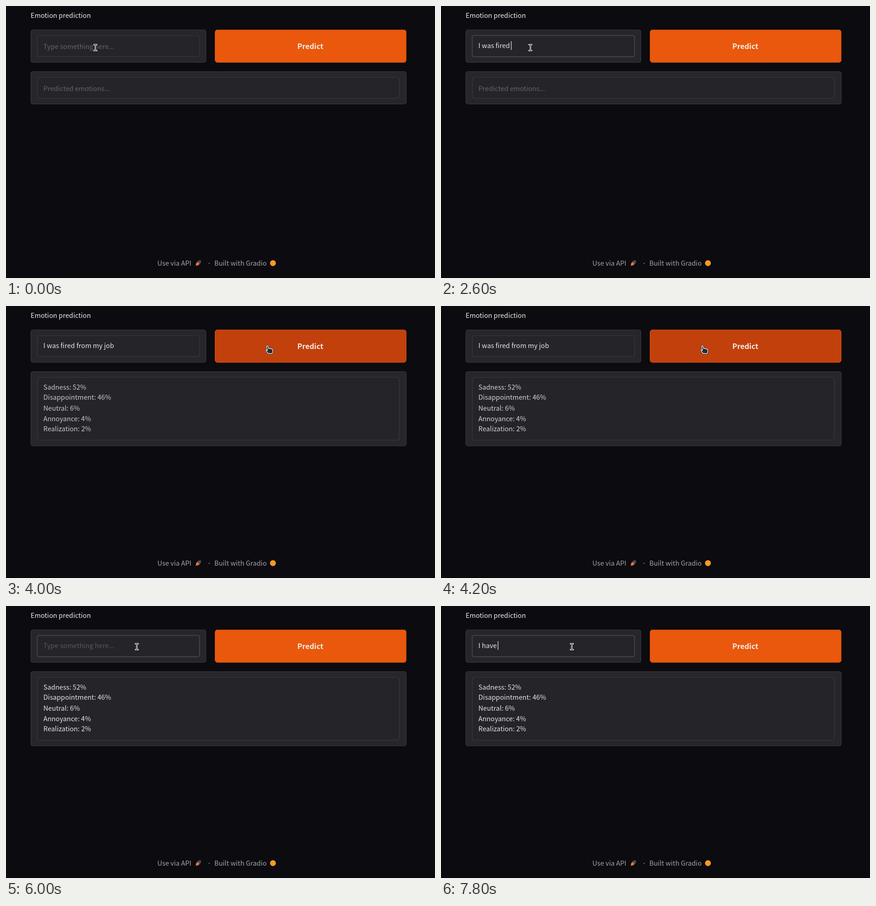
These frames come from a looping animation (941 px wide and 595 px high, 8000 ms). An HTML page with a canvas:

```html
<!DOCTYPE html>
<html lang="en">
<head>
<meta charset="utf-8">
<title>Emotion prediction</title>
<style>
  html, body { margin: 0; width: 100%; height: 100%; overflow: hidden; background: #0c0b0f; }
  canvas { display: block; }
</style>
</head>
<body>
<canvas id="stage" width="941" height="595"></canvas>
<script>
const ctx = document.getElementById("stage").getContext("2d");
const LOOP = 8000, STEP = 100;
const FAMILY = '"Noto Sans CJK JP", "Noto Sans CJK SC", "Noto Sans CJK", "Open Sans", sans-serif';
const BODY = `14.68px ${FAMILY}`, BOLD = `bold 16px ${FAMILY}`;
const PANEL = "#27262a", LINE = "#3c3b40", INK = "#e4e4e7";
const ZOOM = 1.025, LINE_HEIGHT = 22.4;
const RESULTS = ["Sadness: 52%", "Disappointment: 46%", "Neutral: 6%", "Annoyance: 4%", "Realization: 2%"];

// Each entry is [time, text typed at that time].
const KEYS = [
  [1200, "I"], [1300, " "], [1500, "w"], [1600, "a"], [1700, "s"], [1800, " "],
  [2000, "f"], [2100, "i"], [2200, "r"], [2300, "e"], [2400, "d"],
  [2600, " "], [2700, "f"], [2800, "r"], [2900, "om"], [3000, " "], [3100, "m"],
  [3200, "y"], [3300, " j"], [3400, "ob"],
  [7100, "I"], [7200, " "], [7300, "h"], [7400, "a"], [7500, "v"], [7600, "e"], [7700, " "]
];
const CLEARED = 5900;
// Pointer stops: time, x, y.
const POINTER = [
  [0, 196, 91], [3400, 196, 91], [3500, 270, 95], [3600, 428, 100], [3700, 545, 97], [3800, 576, 95],
  [4700, 576, 95], [4800, 545, 94], [4900, 450, 90], [5000, 351, 88], [5100, 305, 88], [5300, 287, 89], [LOOP, 287, 89]
];

const within = (t, a, b) => t >= a && t < b;
const ramp = (t, a, b) => Math.min(1, Math.max(0, (t - a) / (b - a)));
const mix = (a, b, k) => `rgb(${a.map((v, i) => Math.round(v + (b[i] - v) * k))})`;

function pointerAt(t) {
  const i = POINTER.findIndex(p => p[0] > t);
  const [t0, x0, y0] = POINTER[i - 1], [t1, x1, y1] = POINTER[i];
  const k = ramp(t, t0, t1);
  return [x0 + (x1 - x0) * k, y0 + (y1 - y0) * k];
}

function typedAt(t) {
  const since = t >= CLEARED ? CLEARED : 0;
  return KEYS.filter(k => within(k[0], since, t + 1)).map(k => k[1]).join("");
}

function caretOn(t) {
  return within(t, 100, 600) || within(t, 1000, 3500) || within(t, 6100, 6600) || t >= 7100;
}

function text(str, x, y, color, font = BODY, align = "left") {
  ctx.font = font;
  ctx.textAlign = align;
  ctx.fillStyle = color;
  ctx.fillText(str, x, y);
}

function dot(x, y, r, color) {
  ctx.fillStyle = color;
  ctx.beginPath();
  ctx.arc(x, y, r, 0, Math.PI * 2);
  ctx.fill();
}

function box(x, y, w, h, r, fill, stroke, width = 1) {
  ctx.beginPath();
  ctx.roundRect(x, y, w, h, r);
  ctx.fillStyle = fill;
  ctx.fill();
  ctx.strokeStyle = stroke;
  ctx.lineWidth = width;
  ctx.stroke();
}

function drawInput(t) {
  const focus = t < 3900 ? ramp(t, 0, 300) : ramp(t, 5600, 5900);
  const typed = typedAt(t);
  box(54.5, 52.3, 384, 71, 4, PANEL, LINE);
  box(69 - focus * .5, 65 - focus * .5, 355 + focus, 45.5 + focus, 4, "#252428",
    mix([60, 59, 64], [67, 66, 72], focus), 1 + focus);
  if (typed) text(typed, 82, 92, INK);
  else if (t < CLEARED) text("Type something here...", 82, 94, "#646367");
  else text("Type something here...", 82, 92, "#505a67");
  if (caretOn(t)) {
    ctx.font = BODY;
    ctx.fillStyle = "#f4f4f5";
    ctx.fillRect(Math.round(81.5 + ctx.measureText(typed).width) - .5, typed ? 77 : 78, 1.2, 19);
  }
}

function drawButton(t) {
  const hover = ramp(t, 3600, 3800) * (1 - ramp(t, 4700, 5100));
  box(458.6, 52.3, 419.2, 71, 5, mix([233, 88, 12], [194, 64, 12], hover), "#e4560f");
  text("Predict", 667.5, 94, "#f6eeea", BOLD, "center");
}

function drawOutput(t) {
  const done = t >= 4000, grow = done ? 91.5 : 0;
  box(54.5, 143.5, 823.5, 71 + grow, 4, PANEL, LINE);
  box(69, 156, 793.5, 46 + grow, 4, "#252428", LINE);
  if (!done) return text("Predicted emotions...", 82, 185.5, "#646367");
  ctx.globalAlpha = .85 + .15 * ramp(t, 4000, 4500);
  // Lines sit on whole pixels of the unzoomed page.
  RESULTS.forEach((line, i) => text(line, 82, 182.9 + Math.floor(i * LINE_HEIGHT + .2) * ZOOM, INK));
  ctx.globalAlpha = 1;
}

function drawRocket() {
  ctx.save();
  ctx.translate(421.8, 562.5);
  ctx.rotate(Math.PI / 4);
  ctx.fillStyle = "#4a4c57";
  ctx.fill(new Path2D("M0-8.5Q5-5 3.4 1H-3.4Q-5-5 0-8.5Z"));
  ctx.fillStyle = "#ef7136";
  ctx.fill(new Path2D("M-3.4-.5H3.4L3.2 3.5 0 8 -3.2 3.5Z"));
  ctx.restore();
}

function drawFooter() {
  text("Use via API", 332, 568, "#a3a3aa");
  drawRocket();
  dot(445.7, 563, 1.1, "#a3a3aa");
  text("Built with Gradio", 457, 568, "#a3a3aa");
  dot(585.5, 562.5, 6.5, "#f59a23");
}

function drawBeam(x, y) {
  const beam = new Path2D("M-2.6-6.5H2.6M0-6.5V6.5M-2.6 6.5H2.6");
  ctx.translate(x, y);
  ctx.lineCap = "square";
  for (const [color, width] of [["#151417", 4.6], ["#efefef", 3.2], ["#29282c", 1]]) {
    ctx.strokeStyle = color;
    ctx.lineWidth = width;
    ctx.stroke(beam);
  }
}

function drawHand(x, y) {
  const hand = new Path2D("M-3.5-6.5Q-2.2-8.6-.6-6.7L.7-1.9Q2.5-3 3.9-1.7 5.6-2.4 6.6-1 8.6-1.2 8.9 1V5.5L7.4 8H-.2L-2.2 5.4-4.4 2.7Q-5 .7-3.3.8L-1.6 2Z");
  ctx.translate(x - .7, y + .2);
  ctx.scale(1.1, 1.1);
  ctx.lineJoin = "round";
  ctx.strokeStyle = "#202024";
  ctx.lineWidth = 2.6;
  ctx.stroke(hand);
  ctx.fillStyle = "#2a292c";
  ctx.fill(hand);
  ctx.strokeStyle = "#f2eeec";
  ctx.lineWidth = 1.3;
  ctx.stroke(hand);
}

function drawPointer(t) {
  const [x, y] = pointerAt(t);
  ctx.save();
  (x >= 458 ? drawHand : drawBeam)(x, y);
  ctx.restore();
}

function render(t) {
  ctx.fillStyle = "#0c0b0f";
  ctx.fillRect(0, 0, 941, 595);
  ctx.fillStyle = "#000";
  ctx.fillRect(0, 594, 941, 1);
  text("Emotion prediction", 54, 26, "#ececef");
  drawInput(t);
  drawButton(t);
  drawOutput(t);
  drawFooter();
  drawPointer(t);
}

const start = performance.now();
function tick() {
  const t = (performance.now() - start) % LOOP;
  render(Math.floor(t / STEP) * STEP);
  requestAnimationFrame(tick);
}
tick();
</script>
</body>
</html>
```
